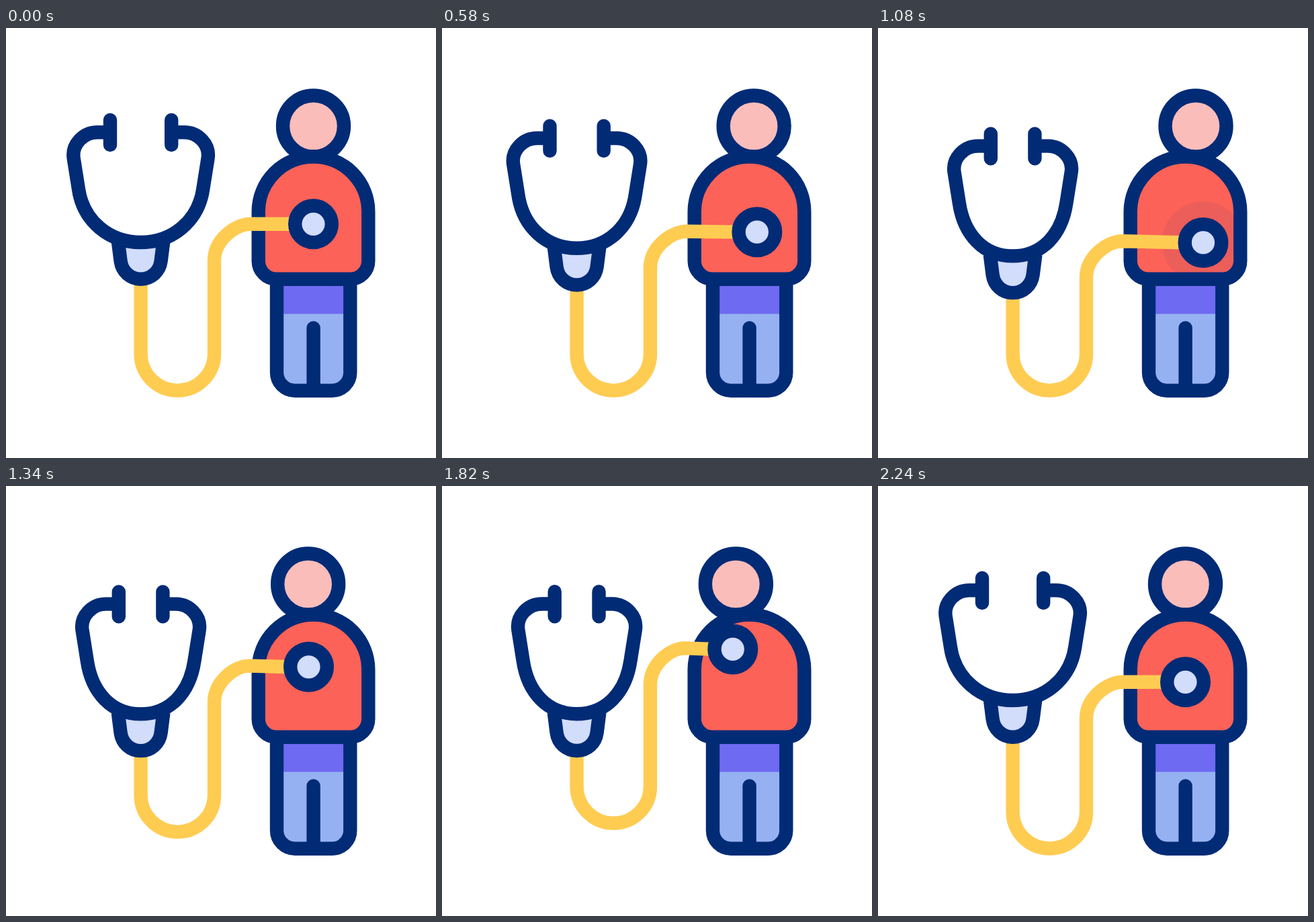
These frames come from a looping animation (640 by 640 pixels, 2400 ms). An HTML page:

```html
<!DOCTYPE html>
<html lang="en">
<head>
<meta charset="utf-8">
<title>Check-up</title>
<style>
html, body { margin: 0; width: 100%; height: 100%; overflow: hidden; background: #fff; }
svg { display: block; width: 100vw; height: 100vh; }
.line { fill: none; stroke: #022b76; stroke-width: 20.4; }
.round { stroke-linecap: round; }
</style>
</head>
<body>
<svg viewBox="0 0 640 640">
  <g id="legs">
    <path fill="#95b1f2" d="M403 400H512.3V513a27 27 0 0 1-27 27H430a27 27 0 0 1-27-27Z"/>
    <path fill="#6e6af2" d="M403 374H512.3V425.5H403Z"/>
    <path class="line" d="M403 374V512.7a27 27 0 0 0 27 27H485.3a27 27 0 0 0 27-27V374"/>
    <path class="line round" d="M457.6 446.5V538"/>
  </g>
  <circle id="head" class="line" cy="146" r="45.5" style="fill:#fbbdba"/>
  <path class="line" style="fill:#fc6257" d="M375.7 273.3a81.8 81.8 0 0 1 163.6 0V346.8a27 27 0 0 1-27 27H402.7a27 27 0 0 1-27-27Z"/>
  <circle id="pulse" fill="#022b76"/>
  <path id="tube" class="line" style="stroke:#ffcc52"/>
  <circle id="chest" class="line" r="27.3" style="fill:#d2dcfb"/>
  <path id="cup" class="line" style="fill:#d2dcfb" d="M166.8 317L170.6 347C172.7 362.5 185 373.7 200.6 373.7S228.5 362.5 230.6 347L234.4 317"/>
  <path id="bowl" class="line round"/>
</svg>
<script>
const LOOP = 2400;
const MID = 200.6;
const REST = { head: 457.5, cx: 457.5, cy: 291.8, base: 484.9, bend: 346.2, topX: 364.5, topY: 291.8, grip: 0 };
const LOW = { head: 473, cx: 484, cy: 319.4, base: 484.9, bend: 371.7, topX: 364.5, topY: 317.3, grip: 1 };
const HIGH = { head: 437.2, cx: 432.6, cy: 242.5, base: 446.9, bend: 295.5, topX: 362, topY: 241, grip: 1 };
const MOVES = [[400, REST, LOW], [1100, LOW, HIGH], [1800, HIGH, REST]];
const MOVE_TIME = 400;
const PULSES = [800, 1500];
const PULSE_TIME = 300;

const $ = id => document.getElementById(id);
const clamp = x => Math.max(0, Math.min(1, x));
const ease = x => x * x * (3 - 2 * x);
const mix = (a, b, p) => a + (b - a) * p;

function set(id, attrs) {
  for (const key in attrs) $(id).setAttribute(key, attrs[key]);
}

function poseAt(t) {
  const [start, from, to] = MOVES.findLast(m => t >= m[0]) || [0, REST, REST];
  const p = ease(clamp((t - start) / MOVE_TIME));
  const pose = {};
  for (const key in from) pose[key] = mix(from[key], to[key], p);
  return pose;
}

function tubePath({ cx, cy, base, bend, topX, topY }) {
  const k = 0.448;
  return `M${MID} 340V${base}A54.7 54.7 0 0 0 310 ${base}V${bend}` +
    `C310 ${mix(topY, bend, k)} ${mix(310, topX, 1 - k)} ${topY} ${topX} ${topY}L${cx - 30} ${cy}`;
}

// One half of the headset; side is 1 for left and -1 for right.
function halfBowl(grip, side) {
  const dx = 12.8 * grip, dy = 20.4 * grip;
  const at = (x, y, shift = dx) => `${MID + side * (x + shift - MID)} ${y + dy} `;
  return `M${at(155, 137)}L${at(155, 174)}M${at(155, 155.2)}L${at(136, 155.2)}` +
    `C${at(115, 155.2)}${at(97.6, 173.5)}${at(100.7, 194)}L${at(108, 240)}` +
    `C${at(115, 287)}${at(153, 319, 4 * grip)}${at(MID, 319, 0)}`;
}

function draw(t) {
  const pose = poseAt(t);
  const { head, cx, cy, grip } = pose;
  set('head', { cx: head });
  set('chest', { cx, cy });
  set('tube', { d: tubePath(pose) });
  set('cup', { transform: `translate(0 ${20.4 * grip})` });
  set('bowl', { d: halfBowl(grip, 1) + halfBowl(grip, -1) });

  const start = PULSES.find(s => t >= s && t < s + PULSE_TIME);
  const x = start === undefined ? 1 : (t - start) / PULSE_TIME;
  set('pulse', { cx, cy, r: mix(37.4, 61.5, ease(x)), opacity: 1 - x });
}

function tick() {
  draw(performance.now() % LOOP);
  requestAnimationFrame(tick);
}
tick();
</script>
</body>
</html>
```
